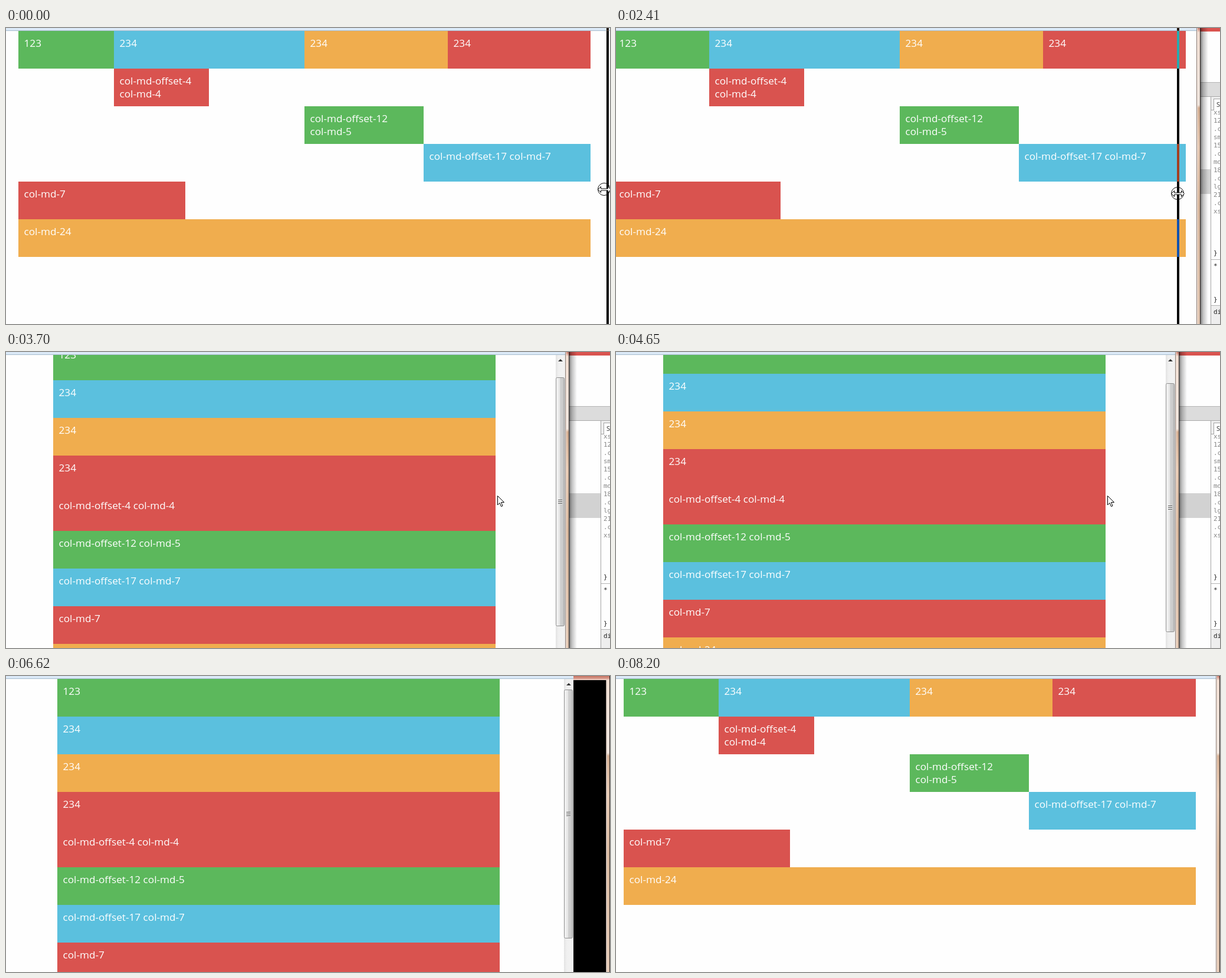
These frames come from a looping animation (1024x503 px, 8480 ms). An HTML page with a canvas:

```html
<!DOCTYPE html>
<html>
<head>
<meta charset="utf-8">
<style>
html, body { margin: 0; height: 100%; overflow: hidden; background: #fefefe; }
canvas { display: block; }
</style>
</head>
<body>
<canvas id="stage" width="1024" height="503"></canvas>
<script>
const ctx = document.getElementById('stage').getContext('2d');
const H = 503, LOOP = 8480, ROW = 64, TOP = 5;
const GREEN = '#5cb85c', BLUE = '#5bc0de', ORANGE = '#f0ad4e', RED = '#d9534f';

// Grid cells: colour, words, first column, span, row in the wide layout
const cells = [
  [GREEN, '123', 0, 4, 0],
  [BLUE, '234', 4, 8, 0],
  [ORANGE, '234', 12, 6, 0],
  [RED, '234', 18, 6, 0],
  [RED, 'col-md-offset-4 col-md-4', 4, 4, 1],
  [GREEN, 'col-md-offset-12 col-md-5', 12, 5, 2],
  [BLUE, 'col-md-offset-17 col-md-7', 17, 7, 3],
  [RED, 'col-md-7', 0, 7, 4],
  [ORANGE, 'col-md-24', 0, 24, 5]
];

// edge: right end of the page; outer: window frame ahead of the page; line: drag line
const steps = [
  [0, { edge: 1034, outer: 0, scroll: 0, line: 1020, cur: [1014, 274, 'drag'] }],
  [120, { line: 1014, cur: [1012, 274, 'drag'] }],
  [250, { line: 1007, cur: [1006, 275, 'drag'] }],
  [370, { line: 1000, cur: [999, 276, 'drag'] }],
  [500, { line: 994, cur: [993, 277, 'drag'] }],
  [630, { line: 990, cur: [989, 277, 'drag'] }],
  [780, { line: 988, cur: [987, 277, 'drag'] }],
  [930, { line: 0, edge: 984, cur: [987, 277, 'size'] }],
  [1180, { cur: [980, 268, 'arrow'] }],
  [1310, { cur: [968, 269, 'arrow'] }],
  [1440, { cur: [950, 272, 'arrow'] }],
  [1580, { cur: [938, 274, 'arrow'] }],
  [1720, { cur: [942, 276, 'arrow'] }],
  [1860, { cur: [960, 277, 'arrow'] }],
  [2000, { cur: [976, 277, 'arrow'] }],
  [2140, { cur: [987, 281, 'size'] }],
  [2260, { line: 980, cur: [980, 281, 'drag'] }],
  [2410, { line: 953, cur: [952, 281, 'drag'] }],
  [2540, { line: 953, cur: [952, 281, 'drag'] }],
  [2690, { line: 0, edge: 948, cur: [952, 281, 'size'] }],
  [3090, { cur: [900, 266, 'arrow'] }],
  [3250, { cur: [824, 256, 'arrow'] }],
  [3400, { cur: [833, 244, 'arrow'] }],
  [3700, { scroll: 21 }],
  [3820, { scroll: 43 }],
  [3940, { scroll: 53 }],
  [4650, { scroll: 32 }],
  [4770, { scroll: 11 }],
  [4890, { scroll: 0 }],
  [5020, { cur: [870, 232, 'arrow'] }],
  [5200, { cur: [925, 216, 'arrow'] }],
  [5380, { cur: [952, 213, 'size'] }],
  [5660, { edge: 950, cur: [955, 213, 'drag'] }],
  [5790, { edge: 956, cur: [962, 213, 'drag'] }],
  [5930, { edge: 962, cur: [970, 213, 'drag'] }],
  [6210, { outer: 980, cur: [988, 213, 'drag'] }],
  [6350, { outer: 1000, cur: [1007, 213, 'drag'] }],
  [6480, { outer: 1012, cur: 0 }],
  [6620, { outer: 1017 }],
  [6750, { outer: 1020 }],
  [7010, { outer: 0, edge: 1020 }],
  [7260, { edge: 1018 }],
  [7380, { edge: 1017 }],
  [7780, { cur: [1010, 216, 'arrow'] }],
  [7910, { cur: [972, 300, 'arrow'] }],
  [8050, { cur: [950, 460, 'arrow'] }],
  [8200, { cur: 0 }]
];

function rect(x, y, w, h, color) {
  ctx.fillStyle = color;
  ctx.fillRect(x, y, w, h);
}

function fade(x0, y0, x1, y1, ...stops) {
  const g = ctx.createLinearGradient(x0, y0, x1, y1);
  stops.forEach(([at, color]) => g.addColorStop(at, color));
  return g;
}

function text(str, x, y, color, font) {
  ctx.font = font;
  ctx.fillStyle = color;
  ctx.fillText(str, x, y);
}

function shape(points, x, y) {
  ctx.beginPath();
  points.forEach(([px, py]) => ctx.lineTo(x + px, y + py));
  ctx.closePath();
  ctx.fillStyle = '#fff';
  ctx.strokeStyle = '#000';
  ctx.lineWidth = 1;
  ctx.fill();
  ctx.stroke();
}

function inspector() {
  const mono = '11px "DejaVu Sans Mono", monospace';
  rect(900, 0, 124, H, '#fefefe');
  rect(900, 0, 124, 6, RED);
  rect(900, 92, 124, 25, '#dcdcdc');
  rect(900, 92, 124, 1, '#b4b4b4');
  rect(900, 116, 124, 1, '#a9a9a9');
  rect(900, 240, 108, 42, '#d2d2d2');
  rect(1008, 117, 16, 22, '#eee');
  rect(1008, 117, 1, H, '#a3a3a3');
  rect(1009, 139, 15, 1, '#a3a3a3');
  rect(1013, 120, 11, 19, '#a3a3a3');
  rect(1014, 121, 10, 19, '#fefefe');
  'xs 12 .c sm 15 .c md 18 .c lg 21 .c xs'.split(' ').forEach((word, i) => {
    ctx.save();
    ctx.beginPath();
    ctx.rect(1009, 140, 15, H);
    ctx.clip();
    text(word, 1013, 147 + i * 14, '#888', mono);
    ctx.restore();
  });
  text('S', 1018, 134, '#333', '11px "Open Sans", sans-serif');
  rect(1009, 393, 15, 1, '#b4b4b4');
  rect(1009, 471, 15, 32, '#eee');
  rect(1009, 471, 15, 1, '#b4b4b4');
  text('}', 1013, 386, '#222', mono);
  text('*', 1013, 408, '#222', mono);
  text('}', 1013, 465, '#222', mono);
  text('di', 1013, 486, '#222', mono);
}

function frame(x) {
  rect(x + 6, 0, 16, H, fade(x + 6, 0, x + 20, 0,
    [0, 'rgba(0,0,0,.6)'], [.35, 'rgba(0,0,0,.25)'], [1, 'rgba(0,0,0,0)']));
  rect(x, 0, 6, H, fade(0, 0, 0, H, [0, '#c9786a'], [.015, '#f0dcd0'], [.19, '#efe4dc'],
    [.26, '#efe4dc'], [.27, '#d3ae92'], [.4, '#e6c9b3'], [.6, '#d8b79d'], [1, '#e3c8b4']));
  rect(x, 0, 1, H, '#8a7a72');
  rect(x + 1, 0, 1, H, '#f4e8e0');
  rect(x + 6, 0, 1, H, '#2b2523');
}

function scrollbar(x, scroll) {
  rect(x, TOP, 16, H, fade(x, 0, x + 16, 0, [0, '#e3e3e3'], [.3, '#f0f0f0'], [1, '#f2f2f2']));
  ctx.fillStyle = '#333';
  ctx.beginPath();
  ctx.moveTo(x + 4, 16);
  ctx.lineTo(x + 8, 12);
  ctx.lineTo(x + 12, 16);
  ctx.fill();
  const y = 23 + Math.round(scroll * .94);
  ctx.beginPath();
  ctx.roundRect(x + .5, y + .5, 14, 422, 2);
  ctx.fillStyle = fade(x, 0, x + 15, 0, [0, '#f5f5f5'], [.45, '#e6e6e6'], [.5, '#d2d2d2'], [1, '#c2c2c2']);
  ctx.fill();
  ctx.strokeStyle = '#8f8f8f';
  ctx.lineWidth = 1;
  ctx.stroke();
  for (let i = 0; i < 3; i++) {
    rect(x + 4, y + 208 + i * 3, 7, 1, '#555');
    rect(x + 4, y + 209 + i * 3, 7, 1, '#f4f4f4');
  }
}

function page({ edge, scroll }) {
  const wide = edge > 970;
  const width = wide ? 970 : 750;
  const left = ((wide ? edge : edge - 16) - 22 - width) / 2;
  rect(0, 0, edge, H, '#fefefe');
  ctx.save();
  ctx.beginPath();
  ctx.rect(0, TOP, edge, H);
  ctx.clip();
  cells.forEach(([color, words, col, span, row], i) => {
    const x = Math.round(left + (wide ? col * width / 24 : 0));
    const end = Math.round(left + (wide ? (col + span) * width / 24 : width));
    const y = TOP + (wide ? row : i) * ROW - scroll;
    rect(x, y, end - x, ROW, color);
    const lines = wide && span < 6 ? words.split(' ') : [words];
    lines.forEach((line, n) =>
      text(line, x + 9.5, y + 27 + n * 22, '#fff', '17.2px "Open Sans", "Noto Sans", sans-serif'));
  });
  ctx.restore();
  if (!wide) scrollbar(edge - 16, scroll);
  rect(0, 0, edge, 4, '#dbe9f7');
  rect(0, 4, edge, 1, '#a7bccd');
}

function cursor([x, y, kind]) {
  if (kind === 'arrow') {
    shape([[.5, .5], [.5, 16], [4, 12.5], [6.5, 18.5], [9, 17.5], [6.5, 11.5], [11.5, 11.5]], x, y);
    return;
  }
  if (kind === 'drag') {
    ctx.beginPath();
    ctx.arc(x, y, 10.5, 0, 7);
    ctx.strokeStyle = '#111';
    ctx.lineWidth = 1;
    ctx.stroke();
  }
  const half = [[-11, 0], [-6, -5], [-6, -1.5], [6, -1.5], [6, -5], [11, 0]];
  shape([...half, [6, 5], [6, 1.5], [-6, 1.5], [-6, 5]], x + .5, y + .5);
}

function draw(now) {
  const t = now % LOOP;
  const s = Object.assign({}, ...steps.filter(step => step[0] <= t).map(step => step[1]));
  inspector();
  frame(s.outer || s.edge);
  page(s);
  if (s.outer) {
    rect(s.edge, 0, s.outer + 6 - s.edge, 7, fade(0, 0, 0, 7, [0, '#c4705f'], [.6, '#d99a8c'], [1, '#f3dcd3']));
    rect(s.edge, 7, s.outer - s.edge, H, '#000');
  }
  if (s.line) {
    ctx.globalCompositeOperation = 'difference';
    rect(s.line - 2, 0, 4, H, '#fff');
    ctx.globalCompositeOperation = 'source-over';
  }
  if (s.cur) cursor(s.cur);
}

const start = performance.now();
function tick() {
  draw(performance.now() - start);
  requestAnimationFrame(tick);
}
tick();
</script>
</body>
</html>
```
